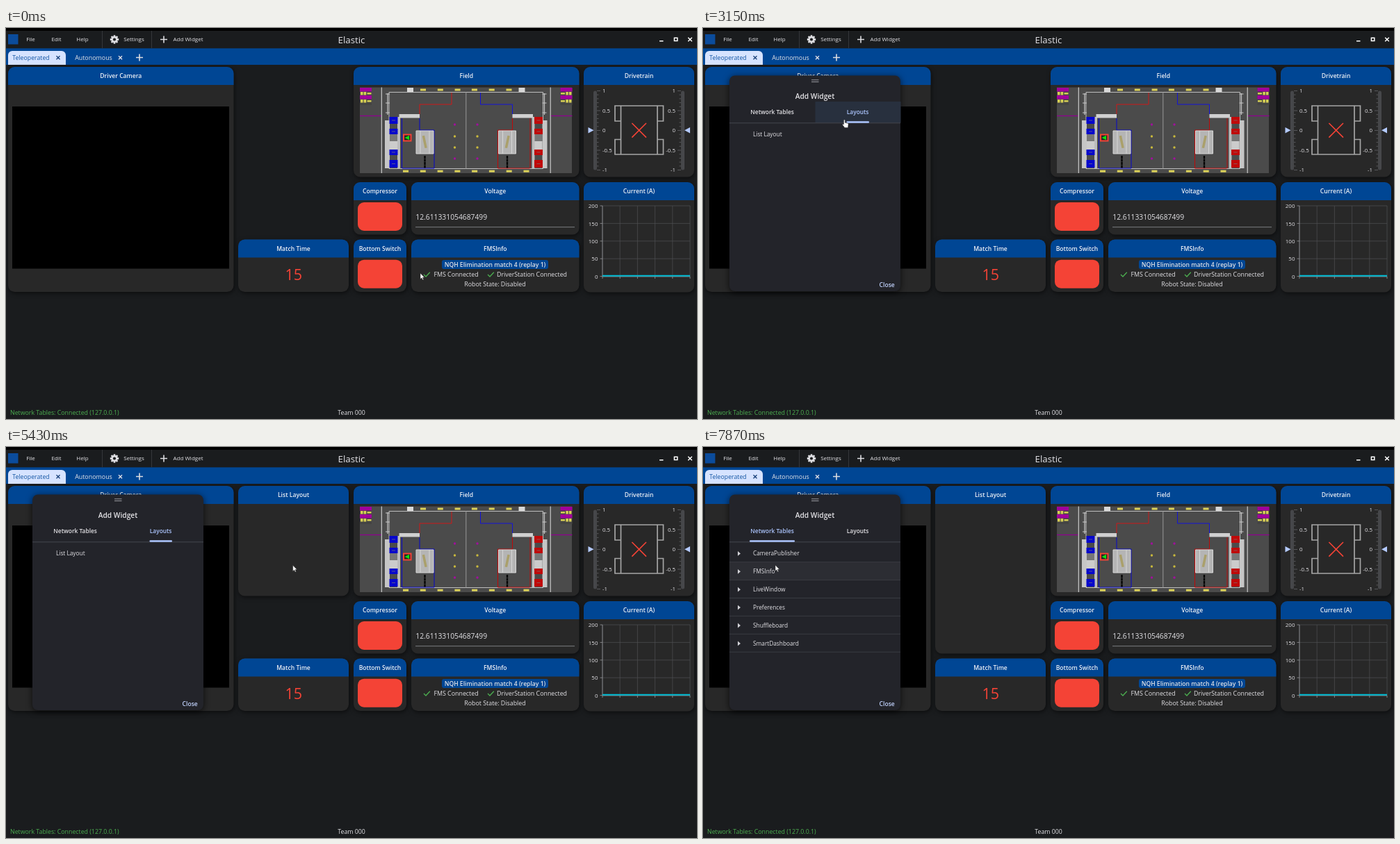
These frames come from a looping animation (994x563 px, 8000 ms). An HTML page:

```html
<!DOCTYPE html>
<html lang="en">
<head>
<meta charset="utf-8">
<title>Dashboard</title>
<style>
  html, body { margin: 0; width: 100%; height: 100%; overflow: hidden; background: #1a1c1e; }
  svg { display: block; width: 100vw; height: 100vh; font-family: "Open Sans", "Noto Sans", sans-serif; }
  .card { filter: drop-shadow(1px 2px 3px rgba(0, 0, 0, .55)); }
  .dialog { filter: drop-shadow(0 2px 5px rgba(0, 0, 0, .7)); }
</style>
</head>
<body>
<svg id="stage" viewBox="0 0 994 563"></svg>
<script>
const BLUE = '#004694', RED = '#f44336', LIGHT = '#adc6ff', PALE = '#e3e2e6', CELL = 82.8;

// Markup helpers
const rect = (x, y, w, h, fill, r = 0, more = '') =>
  `<rect x="${x}" y="${y}" width="${w}" height="${h}" rx="${r}" fill="${fill}" ${more}/>`;
const line = (d, color, width = 1, more = '') =>
  `<path d="${d}" fill="none" stroke="${color}" stroke-width="${width}" ${more}/>`;
const shape = (d, fill) => `<path d="${d}" fill="${fill}"/>`;
const text = (x, y, s, size = 8.85, { anchor = 'middle', weight = 400, fill = PALE, id = '' } = {}) =>
  `<text ${id && `id="${id}"`} x="${x}" y="${y + size * .357}" font-size="${size}" text-anchor="${anchor}" ` +
  `font-weight="${weight}" fill="${fill}">${s}</text>`;
const start = { anchor: 'start' }, end = { anchor: 'end' }, bold = { weight: 600 };
const cross = (x, y, r, color, width) =>
  line(`M${x - r} ${y - r}l${2 * r} ${2 * r}m0 ${-2 * r}l${-2 * r} ${2 * r}`, color, width);
const plus = (x, y, r) => line(`M${x - r} ${y}h${2 * r}M${x} ${y - r}v${2 * r}`, '#dcdce0', 1.6);
const range = (n, f) => Array.from({ length: n }, (_, i) => f(i)).join('');

const card = (x, y, w, h, title, body = '') => `<g class="card">${rect(x, y, w, h, '#282828', 9.5)}
  ${shape(`M${x} ${y + 26}v-16.5a9.5 9.5 0 0 1 9.5-9.5h${w - 19}a9.5 9.5 0 0 1 9.5 9.5v16.5z`, BLUE)}</g>
  ${text(x + w / 2, y + 13.4, title, 8.6, { weight: 600, fill: '#eef0f6' })}${body}`;

function titleBar() {
  const gear = range(8, i => rect(154.6, 10.3, 2.8, 3, '#dcdce0', .5, `transform="rotate(${i * 45} 156 16.5)"`));
  return rect(0, 0, 994, 4, '#000') + rect(0, 29.3, 994, 23.7, BLUE) + rect(3, 9, 14.5, 14.5, '#0b4c9c') +
    '<rect id="addHover" x="210" y="4" width="79" height="25.3" fill="#2c2f33"/>' +
    [[35.5, 'File'], [72.5, 'Edit'], [110, 'Help'], [184, 'Settings'], [262, 'Add Widget']]
      .map(([x, s]) => text(x, 16.6, s, 8)).join('') +
    line('M138.5 4v25.3M209.5 4v25.3', '#34363a') + gear +
    '<circle cx="156" cy="16.5" r="3.4" fill="none" stroke="#dcdce0" stroke-width="2.7"/>' +
    plus(227, 16.5, 5) + text(497, 16.8, 'Elastic', 13.3) +
    line('M940 18.8h5.5M961.4 14.2h4.4v4.4h-4.4z', '#fff', 1.5) + cross(984, 16.5, 2.8, '#fff', 1.5) +
    shape('M3 53v-14a6 6 0 0 1 6-6h71a6 6 0 0 1 6 6v14z', '#d6e3ff') +
    text(36, 43, 'Teleoperated', 8.75, { fill: '#1456a4' }) + cross(75, 42.7, 2.5, '#173f78', 1.3) +
    text(126, 43, 'Autonomous', 8.9) + cross(164.5, 42.7, 2.5, PALE, 1.3) + plus(192, 42.5, 5);
}

// Left half of the playing field; the right half is its mirror image
function halfField(team, foe) {
  const dots = [139, 156, 172, 188].map((y, i) =>
    `<circle cx="645.5" cy="${y}" r="1.7" fill="${i % 3 ? '#c9b93c' : '#a0109c'}"/>`).join('');
  return rect(509, 86, 17, 25, '#444') +
    [86, 97].map(y => rect(509, y, 17, 5.5, '#a0009c') +
      line(`M510 ${y + 8.3}h9`, '#d8cf55', 4.5, 'stroke-dasharray="3.6 1"') +
      line(`M519.5 ${y + 8.3}h6`, '#d8cf55', 2.5)).join('') +
    line('M509 126.5h31', '#900090', 1.3) + line('M540.3 85.5v123.5', '#d5d5d5', 1.1) +
    line('M662 92.5h-111v110h111', '#bdbdbd', 1) + line('M662 92v111', '#999', .6) +
    rect(577, 86, 9, 6, '#d8d8d8') +
    line('M549 94v31M546 95h6M546 108h6M546 122h6', '#c8c8c8', 1.2) +
    rect(545, 133, 7, 69, '#c6c6c6') + rect(552, 152.5, 12, 10.5, '#777') + rect(552, 163, 12, 12, '#ccc') +
    rect(563, 128, 4, 74, '#bcbcbc') + rect(565.5, 124, 29.5, 5.5, '#d0d0d0') +
    [[128, 10], [145, 8], [175, 8], [190, 11]].map(([y, h]) =>
      rect(551.5, y, 12, h, team) + line(`M555 ${y + h / 2}h5`, '#777', .7)).join('') +
    line('M569.5 130v72M595 130v17h21v55h-46', team, 1) + line('M595 124v-14h46v-17', foe, 1) +
    rect(590, 148, 25, 33, '#b5b5b5') + line('M590 148h25v33h-25zM596 148v33M609 148v33', '#d6d6d6', 1) +
    rect(600.5, 155, 3.5, 18, '#aaa06b', 0, 'transform="rotate(-12 602 164)"') +
    line('M602.5 184v18', '#050505', 2.4, 'stroke-dasharray="4 .5"') + dots +
    range(3, i => rect(596 + 24.8 * i, 87.5, 8, 3, '#ddd35a')) +
    range(4, i => rect(571 + 24.8 * i, 204.7, 8, 3, '#ddd35a'));
}

const field = rect(509, 85.5, 305, 123.5, '#4b4b4b') + halfField('#0606cc', '#d01818') +
  `<g transform="translate(1323.5) scale(-1 1)">${halfField('#c00808', '#1212d8')}</g>` +
  rect(572, 153.5, 10.5, 9, '#252525', 0, `stroke="${RED}" stroke-width="2"`) + shape('M573.5 158l6.5-3.3v6.6z', '#10e010');

function drivetrain() {
  const labels = ['1', '0.5', '0', '-0.5', '-1'];
  const gauge = (bar, edge, dir) => rect(bar, 90.5, 5, 114, '#46474a', 2.5) +
    range(21, i => line(`M${edge} ${90.5 + i * 5.7}h${dir * (i % 5 ? 2.5 : 5)}`, '#6b6c70', .7));
  return gauge(845, 850, 1) + gauge(971, 971, -1) +
    labels.map((s, i) => text(858, 90.5 + i * 28.4, s, 7.9, start) + text(963, 90.5 + i * 28.4, s, 7.9, end)).join('') +
    line('M884.5 112h52.5v70h-52.5zM884.5 112h-8.5v22h8.5M937 112h8.5v22h-8.5M884.5 160.5h-8.5v21.5h8.5M937 160.5h8.5v21.5h-8.5', '#a5a5a5', 1.7) +
    cross(910.7, 147.3, 10.3, RED, 1.6) +
    shape('M837.5 143l8 4.3-8 4.3zM984 143l-8 4.3 8 4.3z', '#b4caff');
}

const chart = line(range(5, i => `M858 ${256 + i * 25.4}h126`) + range(6, i => `M${858 + i * 25.2} 256v102`), '#505154', .7) +
  line('M858 256v102h126' + range(5, i => `M854.5 ${256 + i * 25.4}h3.5`) + range(6, i => `M${858 + i * 25.2} 358v3`), '#96979a', .8) +
  line('M858 356.8h126', '#00bcd4', 1.9) +
  range(5, i => text(851.5, 256.3 + i * 25.4, 200 - i * 50, 8, end));

const check = x => line(`M${x} 355l3 3 5.8-6.3`, '#4caf50', 1.3);
const fms = rect(627, 334, 153, 13, BLUE, 3) + text(703.5, 340.8, 'NQH Elimination match 4 (replay 1)', 8.6, bold) +
  check(601) + text(647.5, 355.3, 'FMS Connected') + check(693) + text(756.5, 355.3, 'DriverStation Connected') +
  text(703.5, 368.6, 'Robot State: Disabled');

const dashboard =
  card(3, 56, 324.5, 324, 'Driver Camera', rect(9, 113, 312, 233.5, '#000')) +
  card(334, 304.5, 159, 75.5, 'Match Time', text(413.7, 355, '15', 21.5, { fill: RED })) +
  card(500, 56, 324.5, 158.5, 'Field', field) +
  card(831, 56, 159, 158.5, 'Drivetrain', drivetrain()) +
  card(500, 222, 76, 75.5, 'Compressor', rect(506, 251, 64, 41, RED, 9)) +
  card(500, 304.5, 76, 75.5, 'Bottom Switch', rect(506, 333.7, 64, 41, RED, 9)) +
  card(583, 222, 241.5, 75.5, 'Voltage', text(589.3, 272, '12.611331054687499', 10.3, start) + line('M589 286.7h229', '#85878c', .9)) +
  card(583, 304.5, 241.5, 75.5, 'FMSInfo', fms) +
  card(831, 222, 159, 158.5, 'Current (A)', chart);

const topics = ['CameraPublisher', 'FMSInfo', 'LiveWindow', 'Preferences', 'Shuffleboard', 'SmartDashboard'];
const dialog = `<g id="dialog"><g class="dialog">${rect(38, 68.5, 246, 310.5, '#23242a', 8)}</g>
  ${line('M156 74.8h10.5M156 77.6h10.5', '#9a9ba2', 1)}${text(161, 98.6, 'Add Widget', 10.2, bold)}
  ${rect(38, 106, 123, 30.5, '#28303e', 0, 'id="tabHover"')}
  ${line('M38 136.8h246', '#44474f', 1)}
  ${text(99.6, 121.4, 'Network Tables', 8.4, { weight: 600, id: 'tablesTab' })}
  ${text(222.6, 121.4, 'Layouts', 8.35, { weight: 600, id: 'layoutsTab' })}
  ${rect(67, 134.3, 65, 2.4, LIGHT, 1.2, 'id="indicator"')}
  <clipPath id="pane"><rect x="38" y="137.3" width="246" height="222"/></clipPath>
  <g clip-path="url(#pane)"><g id="pages">
    ${rect(38, 140, 246, 25.9, '#2c2d33', 0, 'id="rowHover"')}
    ${topics.map((s, i) => text(72, 153.5 + i * 25.9, s, 8.3, start) +
      shape(`M50 ${150 + i * 25.9}l4 3.4-4 3.4z`, '#d0d0d5') + line(`M38 ${165.7 + i * 25.9}h246`, '#3c3e45', .9)).join('')}
    ${text(318, 153.5, 'List Layout', 8.3, start)}
  </g></g>
  ${text(264.7, 369.5, 'Close', 8.6, { weight: 600, fill: '#c3d4ff' })}</g>`;

const cursor = `<g id="cursor">
  <path id="arrow" d="M0 0v8.6l2-1.8 1.3 3 1.4-.6-1.3-2.9h2.6z" fill="#fff" stroke="#222" stroke-width=".5"/>
  <path id="hand" d="M-1 .8c0-1.2 1.8-1.2 1.8 0v3.4l4 .9c.7.2.9.7.8 1.4l-.6 4.8h-4.700l-3-3.900c-.5-.8.4-1.500 1.700-.5z" fill="#fff" stroke="#222" stroke-width=".4"/>
  <path id="resize" d="M0-5.800l2.500 2.800h-1.800v6h1.800l-2.500 2.800-2.500-2.800h1.800v-6h-1.800z" fill="#fff" stroke="#111" stroke-width=".4"/></g>`;

stage.innerHTML = rect(0, 0, 994, 563, '#1a1c1e') + titleBar() + dashboard +
  text(6, 553.8, 'Network Tables: Connected (127.0.0.1)', 8.8, { anchor: 'start', fill: '#4caf50' }) +
  text(497, 553.8, 'Team 000', 8.75) +
  '<rect id="preview" y="55.300" width="160.600" rx="8" stroke-width="3.300"/><g id="layout"></g>' + dialog + cursor;

const el = Object.fromEntries([...stage.querySelectorAll('[id]')].map(e => [e.id, e]));
const set = (name, attrs) => { for (const k in attrs) el[name].setAttribute(k, attrs[k]); };
const show = (name, on) => { el[name].style.display = on ? '' : 'none'; };
const mix = (a, b, p) => a + (b - a) * p;
const ease = (t, a, b) => { const p = Math.min(1, Math.max(0, (t - a) / (b - a))); return p * p * (3 - 2 * p); };

// Pointer path: time, x, y
const path = [[0, 596, 353], [620, 596, 353], [920, 286, 74], [1200, 254, 17], [1760, 254, 17], [1990, 233, 114.5],
  [2300, 217, 129.5], [3120, 217, 129.5], [3400, 95, 153], [3650, 95, 153], [4060, 322, 148], [4220, 322, 148],
  [4320, 401, 149], [4600, 413, 148], [5180, 413, 148], [5900, 412, 212], [6320, 412, 212], [6500, 411.5, 269],
  [6640, 411.5, 291], [6850, 411.5, 291], [7200, 102, 122], [7440, 102, 122], [7840, 104, 170], [8000, 104, 170]];

function pointerAt(t) {
  const i = path.findIndex(p => p[0] > t), [t0, x0, y0] = path[i - 1], [t1, x1, y1] = path[i];
  const p = (t - t0) / (t1 - t0);
  return [mix(x0, x1, p), mix(y0, y1, p)];
}

function render(t) {
  const [x, y] = pointerAt(t);
  const open = t >= 1580, dragging = t >= 3720 && t < 5180, resizing = t >= 6340 && t < 6700;
  const onAdd = x > 210 && x < 289 && y > 4 && y < 29;
  const onTab = open && x > 38 && x < 284 && y > 106 && y < 137;

  show('addHover', onAdd);
  show('dialog', open);
  show('tabHover', onTab);
  set('tabHover', { x: x < 161.5 ? 38 : 161.5 });

  const page = ease(t, 2640, 2840) - ease(t, 7370, 7560);
  set('pages', { transform: `translate(${-246 * page})` });
  set('indicator', { x: mix(67, 206.5, page), width: mix(65, 32.5, page) });
  set('tablesTab', { fill: page < .5 ? LIGHT : PALE });
  set('layoutsTab', { fill: page < .5 ? PALE : LIGHT });
  const row = Math.floor((y - 140) / 25.9);
  show('rowHover', page === 0 && open && row >= 0 && row < 6 && x > 38 && x < 284);
  set('rowHover', { y: 140 + row * 25.9 });

  // The dragged or resized card, with a preview snapped to the grid
  const left = dragging ? x - 80 : 334, top = dragging ? y - 81 : 56;
  const height = resizing ? y + 3 - 56 : t < 6700 ? 158.5 : 241.5;
  const column = dragging ? Math.round((left - 2.5) / CELL) : 4, valid = column === 4;
  show('layout', t >= 3720);
  if (t >= 3720) el.layout.innerHTML = card(left, top, 159, height, 'List Layout');
  set('layout', { opacity: resizing ? .83 : 1 });
  show('preview', dragging || resizing);
  set('preview', {
    x: column * CELL + 2.1, height: Math.round((height + 6) / CELL) * CELL - 4,
    fill: valid ? 'rgba(255,255,255,.25)' : 'rgba(0,0,0,.1)', stroke: valid ? '#76ff03' : RED,
  });

  const stretch = t > 5800 && t < 6860, hand = !stretch && (onAdd || onTab);
  show('resize', stretch);
  show('hand', hand);
  show('arrow', !stretch && !hand);
  set('cursor', { transform: `translate(${x} ${y})` });
}

function frame() {
  render(performance.now() % 8000);
  requestAnimationFrame(frame);
}
frame();
</script>
</body>
</html>
```
